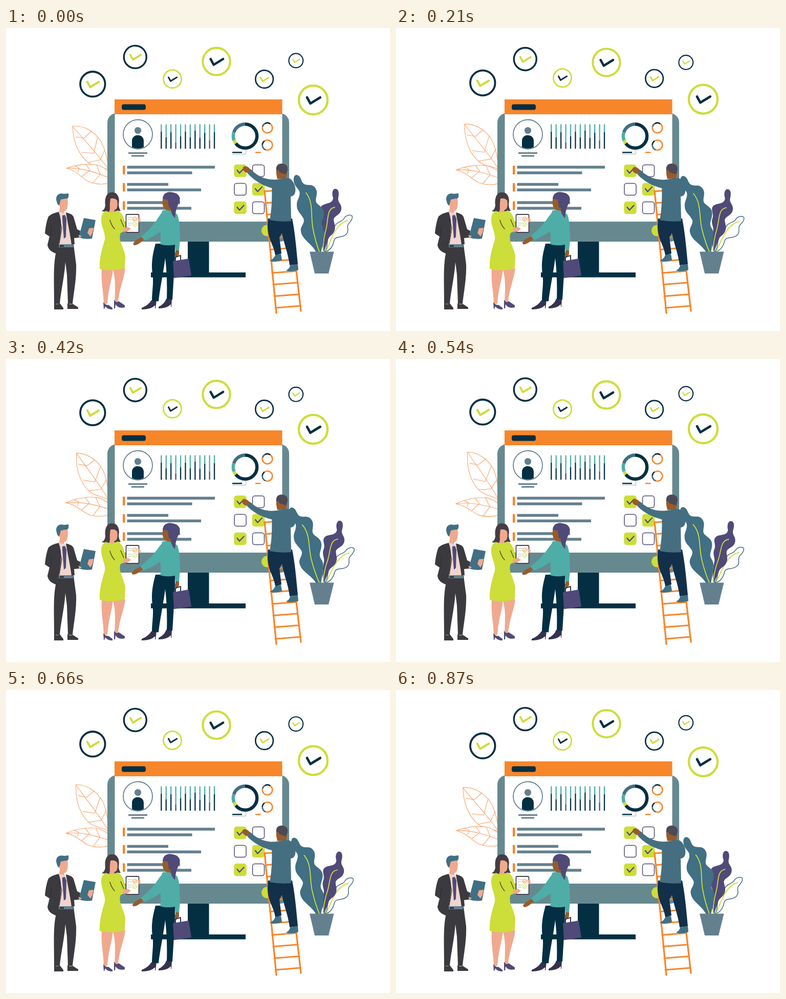
Recreate the animation shown at these times as an HTML page. Size 750 by 590 pixels, loop 0.9 s.

```html
<!DOCTYPE html>
<html lang="en">
<head>
<meta charset="utf-8">
<title>Team checklist</title>
<style>
  html, body { margin: 0; width: 100%; height: 100%; overflow: hidden; background: #fff; }
  svg { display: block; width: 750px; height: 590px; }
  .slate { fill: #64808f } .blue { fill: #416f83 } .navy { fill: #042f42 } .lime { fill: #cddd3a }
  .orange { fill: #f7862b } .purple { fill: #4f4a78 } .teal { fill: #4fada8 } .peach { fill: #f0a98e }
  .brown { fill: #985b2a } .suit { fill: #3b3a3e } .shoe { fill: #34324f } .case { fill: #668990 }
  .tunic { fill: #456f80 } .trousers { fill: #12304a }
  .line { fill: none; stroke-linecap: round; stroke-linejoin: round }
  .vein { fill: none; stroke: #cddd3a; stroke-width: 1.8; stroke-linecap: round }
  .frond { fill: #fff; stroke: #f9a36a; stroke-width: 1.1; stroke-linejoin: round }
</style>
</head>
<body>
<svg viewBox="0 0 750 590">
  <g class="frond">
    <g id="bigFrond">
      <path d="M130 191C149 189 172 200 185 220C194 236 198 254 201 276C186 270 171 271 159 261C138 242 131 216 130 191Z"/>
      <path fill="none" d="M130 191C146 212 170 234 201 276M136 212L153 214L167 200M147 242L171 244L179 213M160 262L184 257L193 237"/>
    </g>
    <g id="smallFrond">
      <path d="M118 273C140 265 163 264 179 267C190 270 200 277 214 292C207 307 177 306 161 299C146 291 140 279 118 273Z"/>
      <path fill="none" d="M118 273C148 272 174 280 212 296M134 268L143 273L140 281M156 265L164 277L148 289M177 267L184 285L169 302"/>
    </g>
  </g>

  <g id="monitor">
    <path class="navy" d="M355 410H396.500V476H468V485.500H283V476H355Z"/>
    <rect class="case" x="198" y="166" width="355" height="250" rx="18"/>
    <path fill="#fff" d="M212.500 166H539.500V377H212.500Z"/>
    <path class="orange" d="M212 139H539.500V168H212Z"/>
    <rect class="navy" x="226" y="148.500" width="47" height="11" rx="4"/>
    <circle class="lime" cx="510" cy="394.500" r="11"/>
    <circle cx="257.500" cy="207" r="28.500" fill="#fff" stroke="#64808f" stroke-width="1.800"/>
    <circle class="slate" cx="257.500" cy="199.500" r="6.600"/>
    <path class="navy" d="M246 232V220C246 205 269 205 269 220V232Q257.500 237 246 232Z"/>
    <path class="slate" d="M239 242H276V245H239ZM245 247.500H270V250.500H245Z"/>
    <path class="line" stroke="#aab8bf" stroke-width="1" d="M442 245.500H468.500V236"/>
    <path class="navy" d="M442 241H461V243.500H442Z"/>
    <path class="orange" d="M487 241H497.500V243.500H487Z"/>
    <path class="orange" d="M228 268H232.500V285H228ZM228 302H232.500V318.500H228ZM228 337.500H232.500V354H228Z"/>
    <path stroke="#64808f" stroke-width="5.600" d="M236.500 271H408M236.500 282H363.500M236.500 304.500H317M236.500 315.300H381M236.500 340H340M236.500 351H362"/>
  </g>
  <g id="badges"></g>

  <g id="plant">
    <g id="whiteLeaf">
      <path fill="#fff" stroke="#416f83" stroke-width="1.500" d="M622 436C631 427 624 412 632 404C639 399 638 388 645 382C650 376 656 378 660 371C664 364 673 363 676 366C678 373 671 378 668 383C665 389 671 394 665 401C657 410 644 404 641 413C639 423 634 434 622 436Z"/>
      <path class="vein" d="M667 375C648 379 637 403 626 434"/>
    </g>
    <g id="purpleLeaf">
      <path class="purple" d="M643 313C650 313 651 322 649 330C647 340 656 342 655 352C654 365 640 365 640 374C641 382 645 387 641 396C637 405 629 405 628 416L621 436C616 424 616 408 618 396C620 388 612 381 616 370C619 361 610 353 617 346C625 340 638 343 639 331C636 323 637 314 643 313Z"/>
      <path class="vein" d="M642 349C626 352 630 372 625 392Q620 410 619 432"/>
    </g>
    <g id="blueLeaf">
      <path class="blue" d="M568 286C576 288 576 297 580 302C587 309 596 302 603 310C613 322 601 332 607 341C612 347 621 350 621 361C621 373 613 379 618 389C625 400 620 406 620 416L615 437H606C598 420 578 412 576 396C574 386 585 380 581 371C576 361 568 357 568 346C567 335 576 328 573 318C569 310 564 309 562 298C561 291 563 286 568 286Z"/>
      <path class="vein" d="M586 321C602 341 594 368 600 393Q604 414 612 436"/>
    </g>
    <path class="slate" d="M593 435.500H640.500L630 478H603Z"/>
  </g>

  <g id="ladder" class="line"></g>

  <g id="climber">
    <g id="reachingArm">
      <path class="brown" d="M480 282C475 282 472 283 468 281C463 278 461 273 464 270C468 267 474 271 476 274L482 278Z"/>
      <path class="tunic" d="M477 275C490 286 503 297 530 295L528 314C504 309 485 298 472 283Z"/>
    </g>
    <path class="brown" d="M528 274L548 276C549 287 548 290 546 293L530 294C529 289 527 283 528 274Z"/>
    <path fill="#4c4a55" d="M528 277C526 265 536 262 544 265C552 268 551 277 547 285L534 281L532 277Z"/>
    <path class="trousers" d="M512 371H559C565 402 567 430 570 460L554 462C551 438 543 421 539 399L534 408L538 439L526 443C523 419 507 410 512 371Z"/>
    <path class="tunic" d="M521 297C531 295 547 290 554 293C562 297 567 311 565 319C564 325 560 328 556 328L557 376Q535 378 515 374C519 354 520 330 519 307Z"/>
    <path class="blue" d="M526 442L537 440L539 452C530 455 522 456 515 453Q523 450 526 442ZM555 462L570 460L571 471C563 474 554 475 547 472Q554 469 555 462Z"/>
  </g>

  <g id="man">
    <path class="peach" d="M104 331H120C122 344 120 356 114 356L113 367H103L105 350ZM95 430Q104 428 104 435Q101 441 95 435ZM96 536H104V543H96ZM122 536H129V543H122Z"/>
    <path class="blue" d="M99 338C95 325 105 320 113 323L122 322C123 330 121 333 117 332L107 334L104 346C101 344 100 342 99 338Z"/>
    <path fill="#efd5cf" d="M103 358L117 361L130 422H104Z"/>
    <path class="purple" d="M110 365L115 364L118 371L117 407L113 410L110 371Z"/>
    <path class="suit" d="M100 422H132L137 460C138 490 132 515 130 537H121L119 480L116 456C114 485 107 513 105 537H94C94 500 92 464 97 440Z"/>
    <path class="slate" d="M103 421H131V427H103Z"/>
    <path fill="#2e2d33" d="M105 423H113V426H105Z"/>
    <path class="suit" d="M103 358C111 380 107 402 103 422L99 427L104 432L97 439C89 436 82 431 81 422L85 406L76 400C77 388 80 373 83 367Q89 361 103 358ZM117 359Q130 362 132 368L139 392L145 395L144 408L133 409L134 421L128 422C125 398 120 378 117 359Z"/>
    <path class="line" stroke="#2a292d" d="M87 403L89 385M104 372L109 390L104 420"/>
    <path class="blue" d="M152 370L175 374L168 410Q155 412 142 408Z"/>
    <path class="peach" d="M162 390L171 389L169 399L165 406L159 399ZM141 403L148 405L144 409Z"/>
    <path class="suit" d="M94 536Q100 540 105 536L112 545V548H94ZM120 536Q126 540 130 537L141 544V547H120Z"/>
  </g>

  <g id="presenter">
    <path fill="#443d43" d="M194 345C192 329 198 319 207 320C218 319 223 332 220 343Q220 350 224 356L200 358L187 357Q194 352 194 345Z"/>
    <path class="peach" d="M202 333Q210 329 217 334C219 347 217 354 212 354L211 360H201L203 352ZM187 468H209C208 488 200 505 198 537H191C190 510 185 493 187 468ZM208 468H233C230 490 222 506 219 532L212 534C213 508 215 490 208 468Z"/>
    <path fill="#443d43" d="M204 332Q203 345 200 357L189 357Q196 350 196 329L213 322L219 338Q213 330 204 332Z"/>
    <path class="lime" d="M195 356Q207 362 218 355C228 360 230 371 233 380V395L224 399C218 413 230 425 233 444L232 467C215 474 197 472 183 469C182 449 187 432 193 412C195 399 185 387 186 370Q187 360 195 356Z"/>
    <path class="line" stroke="#42413f" stroke-width="1.300" d="M203 374Q206 385 212 391M224 373L230 387"/>
    <rect x="234.500" y="363" width="25" height="35" rx="2" fill="#fff" stroke="#45434c" stroke-width="1.800"/>
    <path class="line" stroke="#aebbc1" stroke-width="1" d="M238 369H246M238 373H245M238 380H246M238 384H245"/>
    <g class="line" stroke-width="1">
      <circle cx="251.500" cy="372" r="4" stroke="#f7862b"/><path stroke="#f7862b" d="M249.500 372L251 374L254 370"/>
      <circle cx="251.500" cy="382.500" r="4" stroke="#cddd3a"/><path stroke="#cddd3a" d="M249.500 382.500L251 384.500L254 380.500"/>
    </g>
    <path class="peach" d="M228 391L238 387L244 391L238 396L229 397ZM257 370L262 370L263 376L259 379Z"/>
    <path class="purple" d="M190 534Q196 541 200 539L208 545V548Q198 548 194 542L192 547H191ZM211 529Q215 536 220 532L232 540V544Q219 547 214 538L213 546H211Z"/>
  </g>

  <g id="colleague">
    <g id="pointingArm">
      <path class="brown" d="M268 405L271 412C264 415 259 423 250 423L248 420L254 413Z"/>
      <path class="teal" d="M306 358C295 369 293 383 264 406L271 414C295 403 315 389 326 371Z"/>
    </g>
    <path class="brown" d="M307 331L326 334L324 355L319 360L310 352C306 348 304 340 307 331ZM331 429H338V441L332 448Q328 442 331 436Z"/>
    <path class="navy" d="M292 420L331 419C329 435 331 455 328 480L325 529H314C315 500 314 475 311 448C307 480 300 510 298 532H285C285 512 289 496 286 479C283 457 287 438 292 420Z"/>
    <path class="teal" d="M305 356C313 352 330 357 335 364C340 378 339 395 340 411L338 433H331L330 422Q313 425 301 421C304 406 300 390 301 378Z"/>
    <path class="purple" d="M306 333C306 322 316 317 325 320C335 321 342 328 339 338C336 345 332 349 330 370C325 365 321 358 322 349Q320 352 318 348L316 334Z"/>
    <path class="line" stroke="#34324f" stroke-width="2" d="M331 454V446L341 443V452"/>
    <path class="purple" d="M326 454L357 449L362 482L328 487Z"/>
    <path class="shoe" d="M284 530Q291 534 294 530L292 546H291V540Q283 548 265 548V545Q278 540 284 530ZM313 527Q320 530 324 527L323 543H322V538Q314 546 298 546V543Q310 537 313 527Z"/>
  </g>
</svg>

<script>
const LOOP = 900, STEP = 30;
const NAVY = '#042f42', LIME = '#cddd3a', SLATE = '#416f83', TEAL = '#4fada8', ORANGE = '#f7862b', PURPLE = '#4f4a78';
const byId = id => document.getElementById(id);
const monitor = byId('monitor'), ladder = byId('ladder');

function add(parent, tag, attrs) {
  const node = document.createElementNS('http://www.w3.org/2000/svg', tag);
  for (const key in attrs) node.setAttribute(key, attrs[key]);
  return parent.appendChild(node);
}

function stroke(parent, d, color, width) {
  return add(parent, 'path', { d, class: 'line', stroke: color, 'stroke-width': width });
}

// Each segment: colour, start angle clockwise from the top, sweep
function ring(cx, cy, r, width, segments) {
  for (const [color, start, sweep] of segments)
    add(monitor, 'circle', {
      cx, cy, r, fill: 'none', stroke: color, 'stroke-width': width, pathLength: 360,
      'stroke-dasharray': `${sweep} ${360 - sweep}`, transform: `rotate(${start - 90} ${cx} ${cy})`
    });
}

[202, 213, 203, 223, 211, 202, 213, 200, 214, 204, 219, 203].forEach((split, i) => {
  const x = 303.3 + 9.43 * i;
  add(monitor, 'path', { d: `M${x} 187.500V${split}`, stroke: TEAL, 'stroke-width': 2.3 });
  add(monitor, 'path', { d: `M${x} ${split}V235`, stroke: i % 7 === 3 ? PURPLE : NAVY, 'stroke-width': 2.3 });
});

ring(467, 210.5, 23.2, 6.4, [[NAVY, 0, 232], [LIME, 232, 17], [TEAL, 249, 39], [SLATE, 288, 72]]);
ring(510.5, 194.5, 9.8, 2.6, [[ORANGE, 0, 360], [SLATE, 285, 45], [NAVY, 330, 65]]);
ring(510.5, 228, 9.8, 2.6, [[ORANGE, 0, 360], [SLATE, 200, 75], [NAVY, 275, 50]]);

for (let i = 0; i < 6; i++) {
  const x = i % 2 ? 481.5 : 446, y = 266.5 + 36 * (i >> 1), checked = [0, 3, 4].includes(i);
  add(monitor, 'rect', {
    x, y, width: 23, height: 23, rx: 4.5, fill: checked ? LIME : '#fff',
    stroke: checked ? LIME : PURPLE, 'stroke-width': 1.5
  });
  if (checked) stroke(monitor, `M${x + 5.5} ${y + 10.5}l4.500 5.500l8.500-9`, PURPLE, 2.4);
}

for (let i = 0; i < 11; i++)
  stroke(ladder, `M${505 + 2.1 * i} ${318 + 22.7 * i}L${549 + 2.6 * i} ${315 + 22.6 * i}`, ORANGE, 3);
stroke(ladder, 'M505 317L528 555M549 316L576 551', ORANGE, 3.3);

// x, y, radius, ring colour, check colour, vertical travel, time of the turn
const badges = [
  [169.3, 109.3, 24.3, NAVY, LIME, -6, 540],
  [252.3, 56.4, 22, NAVY, LIME, 5.3, 270],
  [325, 99.2, 17.6, LIME, NAVY, -2.8, 300],
  [411, 65.2, 26.6, LIME, NAVY, 4.8, 540],
  [504.6, 99.6, 17.3, NAVY, LIME, -2.2, 360],
  [566.3, 63.5, 13.9, NAVY, LIME, 6, 360],
  [600, 140.2, 28, LIME, NAVY, -4.2, 540]
].map(([x, y, r, edge, tick, travel, turn]) => {
  const node = add(byId('badges'), 'g', {});
  add(node, 'circle', { r, fill: '#fff', stroke: edge, 'stroke-width': r * 0.155 });
  stroke(node, `M${-.43 * r} ${-.18 * r}L${-.2 * r} ${.24 * r}L${.49 * r} ${-.18 * r}`, tick, r * 0.17);
  return { node, x, y, travel, turn };
});

// id, pivot, angle, time of the turn
const swings = [
  ['bigFrond', 220, 271, 6.7, 540],
  ['smallFrond', 215, 293, -5.2, 540],
  ['blueLeaf', 611, 436, -4.3, 345],
  ['purpleLeaf', 621, 436, 5.2, 540],
  ['whiteLeaf', 625, 436, 4.2, 300],
  ['reachingArm', 528, 303, -3.8, 450],
  ['pointingArm', 318, 365, 2.9, 400]
];

const swing = (t, turn) => t < turn ? t / turn : (LOOP - t) / (LOOP - turn);

function draw(now) {
  const t = Math.floor(now % LOOP / STEP) * STEP;
  for (const { node, x, y, travel, turn } of badges)
    node.setAttribute('transform', `translate(${x} ${y + travel * swing(t, turn)})`);
  for (const [id, x, y, angle, turn] of swings)
    byId(id).setAttribute('transform', `rotate(${angle * swing(t, turn)} ${x} ${y})`);
  requestAnimationFrame(draw);
}
draw(0);
</script>
</body>
</html>
```
